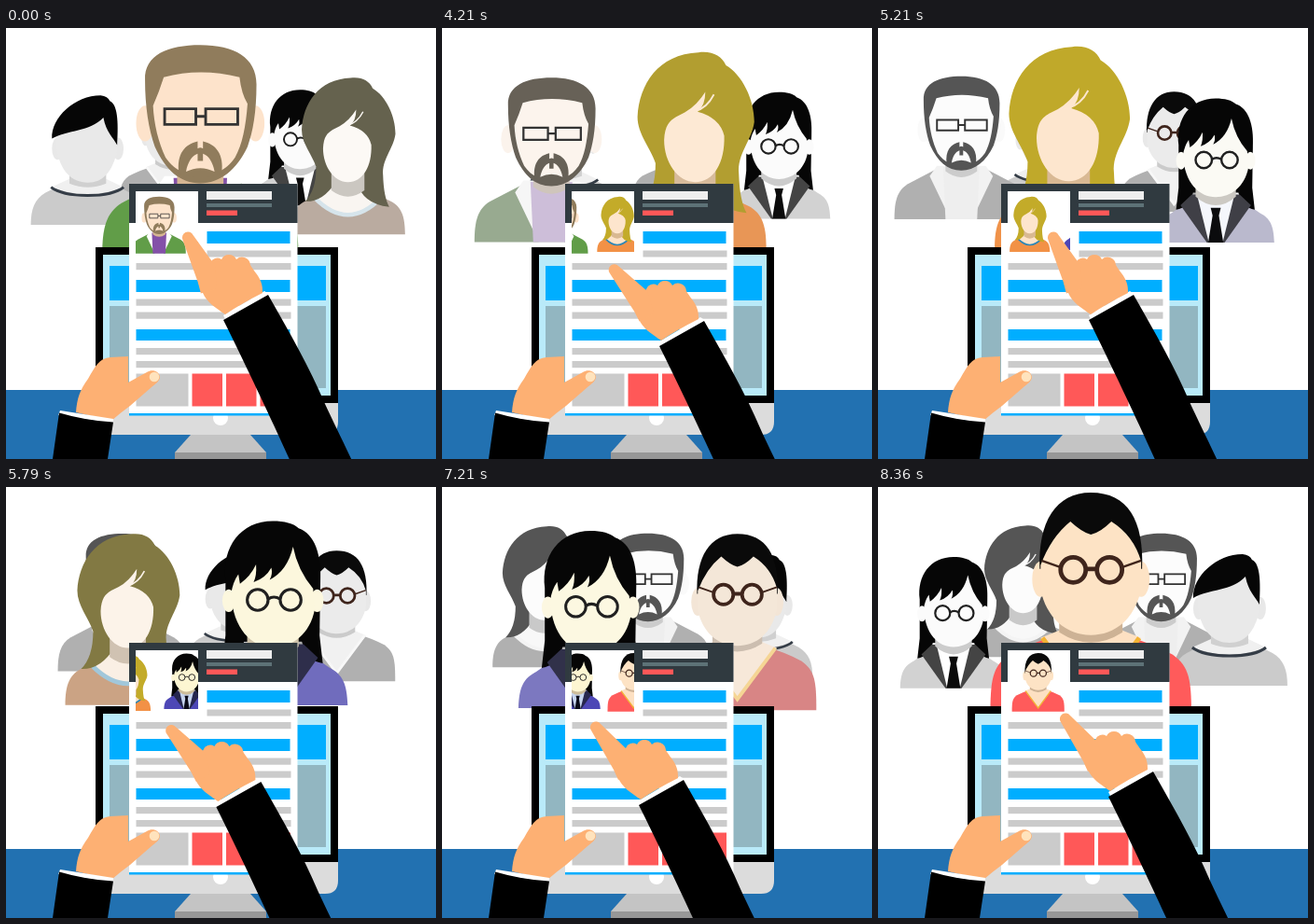
An HTML page for the animation above (8430 ms loop, 461x462 px).

```html
<!DOCTYPE html>
<html lang="en">
<head>
<meta charset="utf-8">
<title>Choosing a candidate</title>
<style>
html, body { margin: 0; width: 100%; height: 100%; overflow: hidden; background: #fff; }
svg { display: block; width: 100%; height: 100%; }
</style>
</head>
<body>
<svg id="stage" viewBox="0 0 461 462" xmlns="http://www.w3.org/2000/svg">
  <defs><clipPath id="photo"><rect x="139" y="175" width="67" height="67"/></clipPath></defs>
  <rect width="461" height="462" fill="#fff"/>
  <rect y="388" width="461" height="74" fill="#2271b1"/>
  <g id="crowd"></g>

  <g id="monitor">
    <path d="M96 400H356V422Q356 436 342 436H110Q96 436 96 422Z" fill="#dcdcdc"/>
    <rect x="96" y="235" width="260" height="167" fill="#000"/>
    <rect x="104" y="243" width="244" height="151" fill="#b9eaf9"/>
    <rect x="111" y="255" width="232" height="37" fill="#00aeff"/>
    <rect x="111" y="298" width="232" height="88" fill="#92b6c1"/>
    <path d="M198 436H262L279 455H181Z" fill="#c4c4c4"/>
    <rect x="181" y="455" width="98" height="7" fill="#979797"/>
    <circle cx="230" cy="418" r="8" fill="#fff"/>
  </g>

  <g id="paper">
    <rect x="132" y="167" width="180.500" height="248" fill="#fff"/>
    <rect x="132" y="167" width="180.500" height="42" fill="#303a40"/>
    <rect x="139" y="175" width="67" height="67" fill="#fff"/>
    <rect x="132" y="413" width="180" height="2.500" fill="#00aeff"/>
  </g>
  <g clip-path="url(#photo)"><g id="minis"></g></g>

  <g id="left">
    <path d="M75 412C76 398 79 388 88 376C96 362 100 354 112 353L131 352V380L151 369C157 365 164 368 165 374C165 378 160 382 156 385L133 405Q122 413 113 421Z" fill="#fdb073"/>
    <circle cx="159" cy="374" r="5.300" fill="#ffe3bd"/>
    <path d="M58 410L115 419V424L56 415Z" fill="#fff"/>
    <path d="M57 412.500Q86 421 115 422.500L109 462H50Z" fill="#000"/>
  </g>

  <g id="right">
    <path d="M0 -5L44 -31L50 -27L3 1Z" fill="#fff"/>
    <path d="M0 0L48 -27C73 17 92 50 109 90C120 114 136 145 153 184H86C72 150 30 60 0 0Z" fill="#000"/>
    <path d="M2 -6C-8 -13 -18 -19 -22 -29L-27 -40L-14 -61A8 8 0 0 1 -2 -65A9 9 0 0 1 14 -65A9 9 0 0 1 29 -59C34 -50 43 -44 42 -29Q20 -18 2 -6Z" fill="#fdb073"/>
    <path id="finger" d="M-27 -38L-51 -80A6 6 0 0 1 -41 -87L-12 -59L-6 -35L-22 -27Z" fill="#fdb073"/>
  </g>
</svg>
<script>
const NS = 'http://www.w3.org/2000/svg';
const $ = id => document.getElementById(id);

function add(parent, tag, attrs = {}) {
  const el = document.createElementNS(NS, tag);
  for (const k in attrs) el.setAttribute(k, attrs[k]);
  return parent.appendChild(el);
}

// Page layout: x, y, width, height, colour
const blue = '#00aeff', gray = '#cbcbcb', red = '#ff5858';
[
  [215, 175, 70, 9, '#eeeeee'], [215, 188, 70, 4, '#5d7277'], [215, 195.500, 33, 5.500, red],
  [215.500, 218, 89, 13, blue], [139.500, 270, 165, 13, blue], [139.500, 323, 165, 12, blue],
  [215.500, 238.500, 90, 7, gray], [139.500, 370.500, 56, 35, gray]
].forEach(([x, y, width, height, fill]) => add($('paper'), 'rect', { x, y, width, height, fill }));
[252, 290.500, 304.500, 343, 357].forEach(y =>
  add($('paper'), 'rect', { x: 139.500, y, width: 166, height: 7.200, fill: gray }));
[199.500, 236, 272.500].forEach(x =>
  add($('paper'), 'rect', { x, y: 370.500, width: 32.500, height: 35, fill: red }));

const oval = (x, y, rx, ry = rx) =>
  `M${x - rx} ${y}a${rx} ${ry} 0 1 0 ${2 * rx} 0a${rx} ${ry} 0 1 0 ${-2 * rx} 0Z`;
const ears = (x, y, rx, ry) => oval(-x, y, rx, ry) + oval(x, y, rx, ry);

// Parts: path, colour in front, colour at the side, line width (none means filled).
// side and back: [scale, drop].
const people = [
  { side: [.66, 42], back: [.61, 40], parts: [
    ['M-110 251C-110 222 -106 204 -88 193L-36 166H36L88 193C106 204 110 222 110 251Z', '#619d48', '#b0b0b0'],
    ['M-40 163L-52 180L-18 251H18L52 180L40 163Z', '#ffffff', '#f2f2f2'],
    ['M-30 165H30L26 251H-26Z', '#8351a8', '#eeeeee'],
    ['M-26 150H26V172Q0 192 -26 172Z', '#d6b693', '#cccccc'],
    [ears(62, 104, 10, 20), '#fde3cb', '#fafafa'],
    ['M-62 55C-63 27 -36 16 0 16C38 16 63 30 63 60C63 92 59 113 53 130C41 156 22 171 0 171C-23 171 -39 156 -51 130C-58 110 -62 85 -62 55Z', '#907c5c', '#555555'],
    ['M-41 52Q0 41 44 52Q46 70 53 82C51 108 47 128 39 142C28 158 14 162 0 162C-14 162 -28 158 -39 142C-47 125 -52 105 -53 84Q-46 68 -41 52Z', '#fde3cb', '#fcfcfc'],
    ['M-24 160C-27 138 -17 127 -3 124V132Q0 130 3 132V124C17 127 27 138 24 160Q0 169 -24 160Z', '#907c5c', '#555555'],
    ['M-16 158C-14 147 -9 140 -3 138V146H3V138C9 140 14 147 16 158Q0 150 -16 158Z', '#fde3cb', '#fcfcfc'],
    ['M-40 87.500H-5V105H-40ZM6 87.500H42V105H6ZM-5 96H6', '#333333', '#333333', 3]
  ] },
  { side: [.7, 41], back: [.62, 31], parts: [
    ['M-83 244C-83 218 -78 202 -58 194L-30 180H30L58 194C78 202 83 218 83 244Z', '#f29146', '#b0b0b0'],
    ['M-48 191Q0 240 48 191L28 178H-28Z', '#fde3c8', '#f8f8f8'],
    ['M-48 191Q0 240 48 191', '#2b86b6', '#f4f4f4', 6],
    ['M4 17C20 15 31 21 36 32C55 43 69 72 69 98C66 120 49 135 51 158Q52 190 60 204Q20 199 14 168H-18Q-36 197 -62 196Q-46 180 -46 146C-52 128 -67 112 -67 92C-65 54 -43 19 4 17Z', '#c3ab29', '#555555'],
    ['M-24 150H24V180Q0 198 -24 180Z', '#d9b992', '#c9c9c9'],
    ['M-36 119C-35 102 -30 97 -22 92L-12 87Q2 79 12 63Q12 79 3 86Q29 93 34 114C35 145 22 168 0 168C-20 168 -36 145 -36 119Z', '#fde5cd', '#fcfcfc'],
    ['M-13 90Q2 84 8 71M-1 86Q14 82 22 66', '#fde5cd', '#fcfcfc', 2]
  ] },
  { side: [.615, 70], back: [.53, 62], parts: [
    ['M-93 237C-92 210 -87 199 -70 190L-34 165H34L70 190C87 199 92 210 93 237Z', '#4d47b6', '#d2d2d2'],
    ['M-59 82C-64 40 -40 8 0 8C14 8 26 11 32 17C52 24 61 50 59 85L58 150L62 185Q42 182 36 158H-36Q-42 182 -63 185L-59 150Z', '#060606', '#060606'],
    ['M-38 161L-56 178L-14 237H14L56 178L38 161Z', '#26264e', '#444444'],
    ['M-30 160L-11 237H11L30 160Z', '#c6d4ee', '#ffffff'],
    ['M-32 148H32V164Q0 192 -32 164Z', '#cdbd9b', '#cccccc'],
    ['M-8 182H8L5 194L12 237H-12L-5 194Z', '#0b0b18', '#0b0b0b'],
    [ears(55, 107, 8, 14), '#fdf5d3', '#fbfbfb'],
    ['M-52 98Q-50 84 -43 74L-41 86Q-28 77 -21 62Q-20 76 -24 84Q-9 79 -2 66Q0 74 -4 81Q18 70 25 40Q31 70 50 92L52 118C46 149 24 165 0 165C-26 165 -50 143 -52 98Z', '#fdf6d2', '#fbfbfb'],
    [oval(-19, 106, 13) + oval(22, 106, 13) + 'M-6 105Q1 100 9 105', '#202020', '#202020', 3.600]
  ] },
  { side: [.615, 58], back: [.52, 65], parts: [
    ['M-108 247C-108 207 -106 193 -88 180Q-66 168 -38 160H38Q66 168 88 180C106 193 108 207 108 247Z', '#ff5b5b', '#b0b0b0'],
    ['M-54 162L0 234L54 162L34 154H-34Z', '#fde0c2', '#f1f1f1'],
    ['M-52 162L0 232L52 162', '#f2b233', '#f8f8f8', 5],
    ['M-34 142H34V156Q0 178 -34 156Z', '#cdb295', '#cbcbcb'],
    [ears(54, 99, 9, 19), '#fde3c5', '#e8e8e8'],
    ['M-55 88C-57 38 -38 6 0 6C40 6 57 36 55 88Z', '#0a0a0a', '#0a0a0a'],
    ['M-54 84Q-43 54 -22 37Q-9 49 0 51Q10 49 22 37Q46 52 54 80V110C47 142 26 159 0 159C-27 159 -48 140 -54 110Z', '#fde3c5', '#ebebeb'],
    [oval(-19, 89, 13.500) + oval(20, 89, 13.500) + 'M-5 88H6', '#3f251c', '#3f251c', 4.800],
    ['M-33 86L-53 79M34 86L54 79', '#3f251c', '#3f251c', 2.500]
  ] },
  { side: [1, 0], back: [.88, 5.600], parts: [
    ['M-62 213C-62 196 -58 185 -46 178L-22 166H22L46 178C58 185 62 196 62 213Z', '#cbcbcb', '#cbcbcb'],
    ['M-40 172Q0 187 39 172L20 163H-20Z', '#f0f0f0', '#f0f0f0'],
    ['M-40 172C-25 184 25 184 39 172', '#353d47', '#353d47', 3],
    ['M-20 152H20V168Q0 176 -20 168Z', '#d0d0d0', '#d0d0d0'],
    [ears(33, 130, 6, 12), '#e8e8e8', '#e8e8e8'],
    ['M-34 116L16 92L32 110V132C27 156 16 167 0 167C-18 167 -30 154 -34 130Z', '#e9e9e9', '#e9e9e9'],
    ['M-39 119C-40 96 -14 72 14 72Q22 73 24 78C34 82 33 108 32 126C28 118 20 112 17 96C2 112 -22 109 -39 119Z', '#060606', '#060606']
  ] }
];

function build(parent, person, colour) {
  const g = add(parent, 'g');
  const shapes = person.parts.map(([d, front, side, width]) => {
    const el = add(g, 'path', { d, fill: 'none' });
    if (width) el.setAttribute('stroke-width', width);
    el.setAttribute(width ? 'stroke' : 'fill', colour ? front : side);
    return el;
  });
  return { g, shapes, person };
}
const crowd = people.map(p => build($('crowd'), p, false));
const minis = people.slice(0, 4).map(p => build($('minis'), p, true));

function mix(a, b, k) {
  const ch = (s, i) => parseInt(s.slice(i, i + 2), 16);
  return `rgb(${[1, 3, 5].map(i => Math.round(ch(a, i) + (ch(b, i) - ch(a, i)) * k))})`;
}
const lerp = (a, b, k) => a + (b - a) * k;
const smooth = x => {
  const k = Math.min(1, Math.max(0, x));
  return k * k * (3 - 2 * k);
};

// Smooth curve through keys [x, y]
function curve(keys, x) {
  const last = keys.length - 1;
  let i = 0;
  while (i < last - 1 && x > keys[i + 1][0]) i++;
  const slope = j => {
    const a = keys[Math.max(0, j - 1)], b = keys[Math.min(last, j + 1)];
    return (b[1] - a[1]) / (b[0] - a[0]);
  };
  const [x0, y0] = keys[i], [x1, y1] = keys[i + 1];
  const h = x1 - x0, k = Math.min(1, Math.max(0, (x - x0) / h)), m = 1 - k;
  return y0 * m * m * (1 + 2 * k) + y1 * k * k * (3 - 2 * k)
    + h * k * m * (m * slope(i) - k * slope(i + 1));
}

const ring = [[0, 0], [.5, 79], [.75, 114], [.88, 139], [1, 148], [1.120, 142], [1.500, 115], [2, 74], [2.150, 48], [2.500, 0]];
const turn = [[-8, 0], [-5, .005], [-3, .045], [-1.500, .13], [-1, .155], [0, .21], [3, .44], [9, .735], [13, .93], [16, 1]];
// Pointing hand: time in step, x, y, finger angle
const swipe = [
  [-8, 249, 333, 0], [-5, 247, 332, 0], [-3, 241, 321, 6], [-1.500, 233, 313, 10],
  [-1, 226, 313, 10], [0, 219, 313, 10], [3, 211, 341, 0], [9, 233, 341, -3], [16, 249, 333, 0]
];
const track = n => swipe.map(k => [k[0], k[n]]);
const handX = track(1), handY = track(2), handA = track(3);

function place(item, d) {
  const r = Math.abs(d), { side, back, parts } = item.person;
  const far = Math.min(1, Math.max(0, r - 1));
  const scale = r < 1 ? lerp(1, side[0], r) : lerp(side[0], back[0], far);
  const drop = r < 1 ? side[1] * smooth(r / .8) : lerp(side[1], back[1], smooth(far / .4));
  const x = 229 + Math.sign(d) * curve(ring, r);
  item.g.setAttribute('transform', `translate(${x} ${drop}) scale(${scale})`);
  const tint = Math.min(1, Math.max(0, 1.150 * (1 - r)));
  item.shapes.forEach((el, i) => {
    const [, front, grey, width] = parts[i];
    el.setAttribute(width ? 'stroke' : 'fill', mix(grey, front, tint));
  });
  item.depth = r;
}

const LOOP = 8430, FPS = 14, HOLD = 50, STEP = 24;

function render(ms) {
  let n = Math.floor((ms % LOOP) * FPS / 1000 + .1);
  if (n > 111) n = n < 115 ? 111 : n < 117 ? 115 : 117;
  const at = n - HOLD + 8;
  const step = n < HOLD ? 0 : Math.floor(at / STEP);
  const q = n < HOLD ? -1.500 : at % STEP - 8;
  const pos = step + curve(turn, q);

  crowd.forEach((item, i) => place(item, (i - pos + 7.500) % 5 - 2.500));
  [...crowd].sort((a, b) => b.depth - a.depth).forEach(item => $('crowd').appendChild(item.g));
  minis.forEach((item, i) =>
    item.g.setAttribute('transform', `translate(${172 + 60 * (i - pos)} 176.500) scale(.26)`));
  $('right').setAttribute('transform', `translate(${curve(handX, q)} ${curve(handY, q)})`);
  $('finger').setAttribute('transform', `rotate(${curve(handA, q)} -14 -40)`);
}

let start;
function tick(now) {
  if (start === undefined) start = now;
  render(now - start);
  requestAnimationFrame(tick);
}
render(0);
requestAnimationFrame(tick);
</script>
</body>
</html>
```
